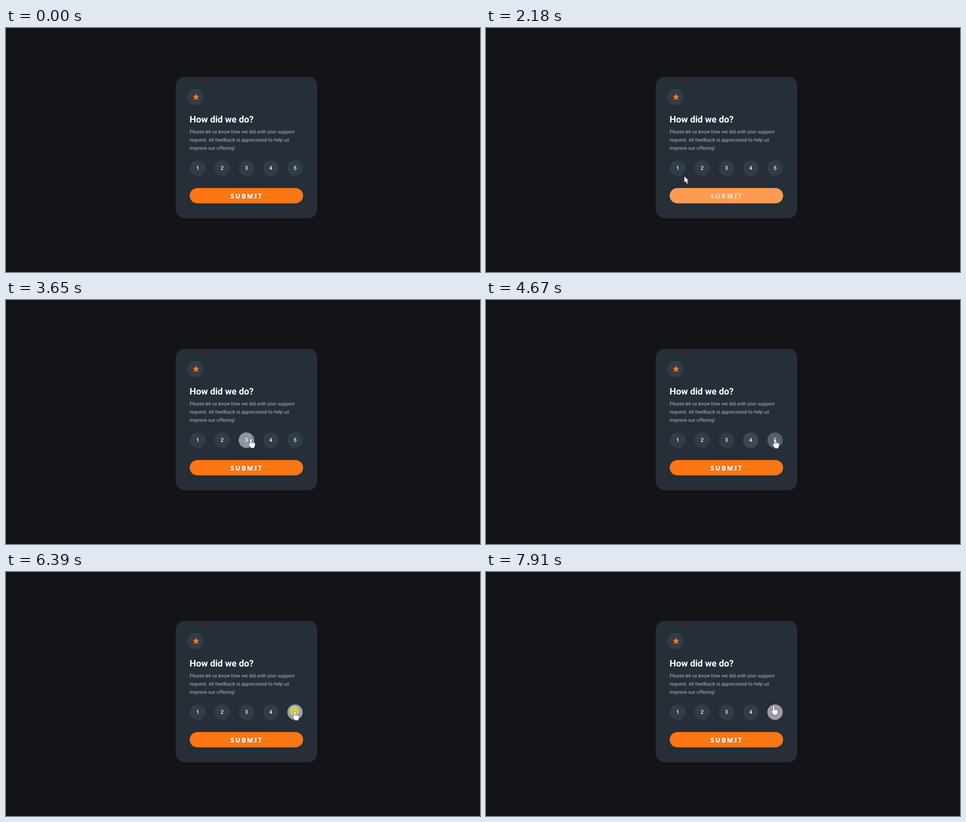
An HTML page for the animation above (8 s loop, 1043x537 px).

```html
<!DOCTYPE html>
<html lang="en">
<head>
<meta charset="utf-8">
<title>Rating card</title>
<style>
  html, body { margin: 0; width: 100%; height: 100%; overflow: hidden; background: #121417; }
  svg { display: block; width: 100%; height: 100%; }
  text { font-family: Roboto, sans-serif; text-rendering: geometricPrecision; }
  .title { font-size: 20px; font-weight: 700; fill: #fff; }
  .body { font-size: 10.72px; fill: #b2b7c0; }
  .digit { font-size: 11.5px; font-weight: 500; fill: #fff; text-anchor: middle; }
  .submit {
    font: 700 14px "Noto Sans", sans-serif; letter-spacing: 2.8px;
    fill: currentColor; stroke: currentColor; stroke-width: .3px;
  }
  .cursor { fill: #fff; stroke: #111; stroke-width: 1; stroke-linejoin: round; paint-order: stroke; }
</style>
</head>
<body>
<svg viewBox="0 0 1043 537">
  <rect width="1043" height="537" fill="#121417"/>
  <rect y="533" width="1043" height="4" fill="#141216"/>
  <rect x="373.2" y="107.2" width="311.8" height="311.6" rx="20" fill="#262e37"/>
  <circle cx="417.5" cy="151.5" r="18" fill="#333d4a"/>
  <path id="star" fill="#fc7614" stroke="#fc7614" stroke-linejoin="round"/>
  <text class="title" x="404" y="208">How did we do?</text>
  <g class="body">
    <text x="404" y="232">Please let us know how we did with your support</text>
    <text x="404" y="250">request. All feedback is appreciated to help us</text>
    <text x="404" y="268">improve our offering!</text>
  </g>
  <g id="ratings"></g>
  <rect id="button" x="404.2" y="352.3" width="249.6" height="33.6" rx="16.8"/>
  <text id="label" class="submit" x="494.3" y="375">SUBMIT</text>
  <circle id="click" cx="635" cy="306" fill="#e0e030"/>
  <g id="cursor" class="cursor">
    <path id="arrow" d="M.5 .5V14L3.7 11L6 16.5L8.3 15.5L6 10.3H10Z"/>
    <g id="hand">
      <path d="M-1.8 2Q-1.8 .5 -.2 .5T1.5 2V7Q3.7 6 4.5 7.8Q6.4 7 7 8.8Q9 8.4 9 10.6V14Q9 16.5 7.3 18.3V20.5H-.8V19Q-3 16.5 -4.8 13Q-5.5 11 -3.8 10.8Q-2.7 10.8 -1.8 12.6Z"/>
      <path d="M1.5 7V10M4.5 8V10.5M7 9V11" fill="none"/>
    </g>
  </g>
</svg>
<script>
const LOOP = 8000, FADE = 250, CLICK = 6390, RADIUS = 17, ROW_Y = 308.5;
const WHITE = [255, 255, 255], ORANGE = [252, 118, 20], SLATE = [51, 61, 74], GREY = [149, 158, 172];
const $ = id => document.getElementById(id);

// Pointer moves: start, end, x, y; it rests in between
const origin = [929, 503];
const moves = [
  [260, 400, 861, 454],
  [610, 890, 639, 401],
  [1270, 1430, 475, 381],
  [1860, 2300, 421, 305],
  [2760, 4070, 595, 305],
  [4460, 4670, 636, 306],
  [4850, 5090, 600, 373],
  [5410, 5620, 616, 353],
  [5620, 5700, 636, 306],
  [6650, 6950, 700, 273],
  [7430, 7730, 645, 300],
  [7730, 7910, 633, 294]
];

const clamp = p => Math.min(1, Math.max(0, p));
const lerp = (a, b, p) => a + (b - a) * p;
const ease = p => { p = clamp(p) ** 0.85; return p * p * (3 - 2 * p); };
const mix = (a, b, p) => `rgb(${a.map((v, i) => Math.round(lerp(v, b[i], p)))})`;
const show = (node, on) => node.setAttribute("visibility", on ? "visible" : "hidden");

function pointerAt(t) {
  let [x, y] = origin;
  for (const [start, end, toX, toY] of moves) {
    const p = clamp((t - start) / (end - start));
    x = lerp(x, toX, p);
    y = lerp(y, toY, p);
  }
  return [x, y];
}

const centers = Array.from({ length: 5 }, (_, i) => 422 + i * 53.5);
const onButton = (x, y) => x > 404 && x < 654 && y > 352 && y < 386;
const onRating = centers.map(cx => (x, y) => Math.hypot(x - cx, y - ROW_Y) < RADIUS);

// Walks the pointer path and returns the [enter, leave] times over an area
function hoverSpans(contains) {
  const spans = [];
  let inside = false;
  for (let t = 0; t < LOOP; t += 2) {
    const now = contains(...pointerAt(t));
    if (now && !inside) spans.push([t, LOOP]);
    if (!now && inside) spans[spans.length - 1][1] = t;
    inside = now;
  }
  return spans;
}
const hover = (spans, t) => Math.max(...spans.map(([enter, leave]) =>
  ease((t - enter) / FADE) * (1 - ease((t - leave) / FADE))));

const buttonSpans = hoverSpans(onButton);
const ratingSpans = onRating.map(hoverSpans);

$("ratings").innerHTML = centers.map((x, i) =>
  `<circle cx="${x}" cy="${ROW_Y}" r="${RADIUS}"/><text class="digit" x="${x}" y="312">${i + 1}</text>`).join("");
const circles = document.querySelectorAll("#ratings circle");

$("star").setAttribute("d", "M" + Array.from({ length: 10 }, (_, i) => {
  const r = i % 2 ? 3.2 : 6.6, a = i * Math.PI / 5;
  return [418 + r * Math.sin(a), 152.3 - r * Math.cos(a)].map(v => v.toFixed(2));
}).join("L") + "Z");

function draw(t) {
  const lit = hover(buttonSpans, t);
  $("button").setAttribute("fill", mix(ORANGE, WHITE, lit));
  $("label").setAttribute("color", mix(WHITE, ORANGE, lit));
  circles.forEach((circle, i) => {
    const rest = i === 4 && t >= CLICK ? ORANGE : SLATE;
    circle.setAttribute("fill", mix(rest, GREY, hover(ratingSpans[i], t)));
  });

  const ripple = (t - CLICK) / 260;
  show($("click"), ripple >= 0 && ripple < 1);
  $("click").setAttribute("r", lerp(11, 19, clamp(ripple)));
  $("click").setAttribute("opacity", 0.7 * (1 - clamp(ripple)));

  const [x, y] = pointerAt(t);
  const visible = t >= moves[0][0];
  const pointing = onButton(x, y) || onRating.some(contains => contains(x, y));
  show($("arrow"), visible && !pointing);
  show($("hand"), visible && pointing);
  $("cursor").setAttribute("transform", `translate(${Math.round(x)} ${Math.round(y)})`);
}

const start = performance.now();
function tick() {
  draw((performance.now() - start) % LOOP);
  requestAnimationFrame(tick);
}
tick();
</script>
</body>
</html>
```
